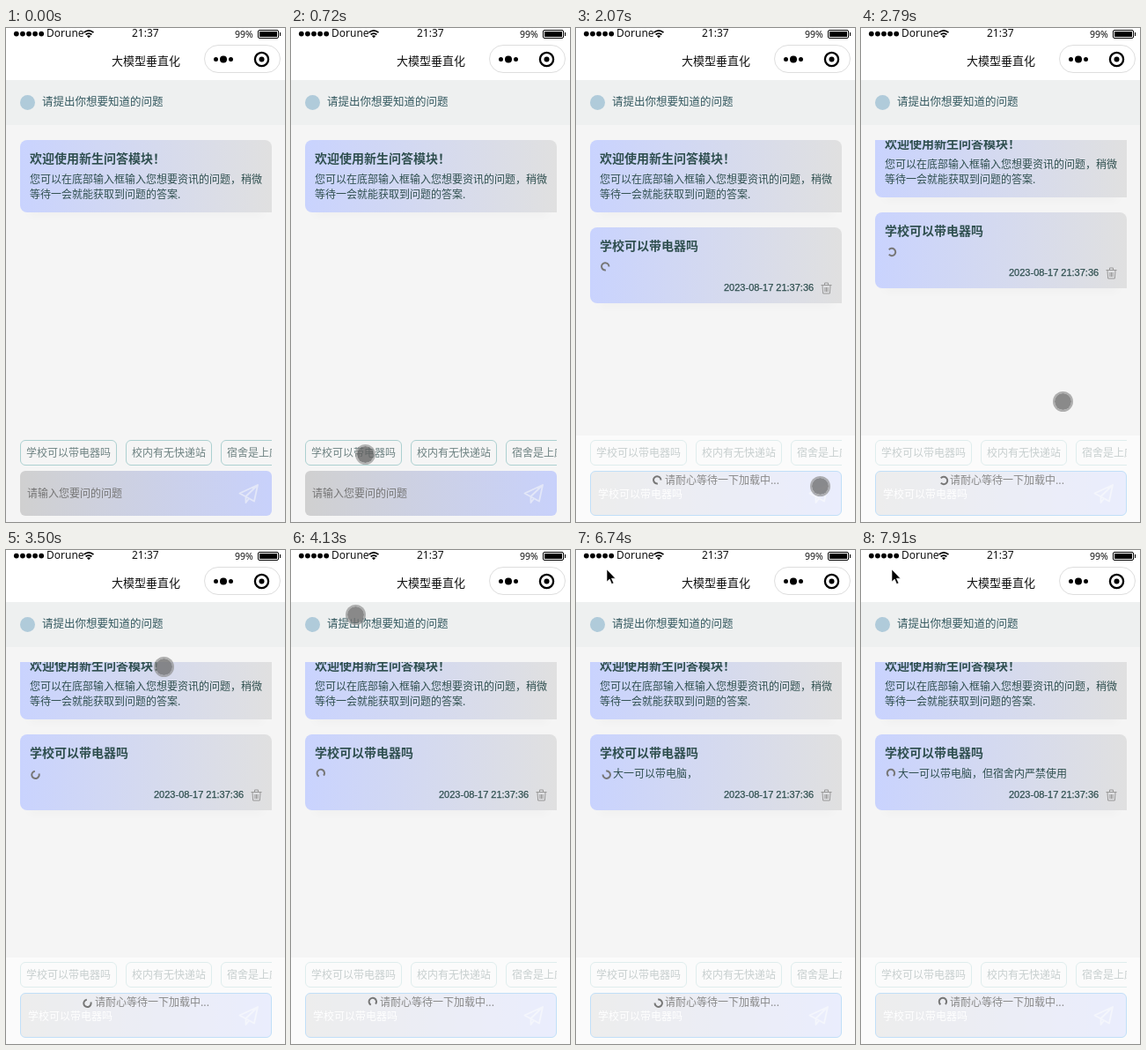
Animation of 317x560 px, one loop 8000 ms. Source, as an HTML page:

```html
<!DOCTYPE html>
<html lang="zh-CN">
<head>
<meta charset="utf-8">
<title>大模型垂直化</title>
<style>
html, body { margin: 0; width: 100%; height: 100%; overflow: hidden; }
body { background: #f5f5f5; font: 12px/20px "Noto Sans CJK SC", "Noto Sans CJK", sans-serif; color: #2f4f4f; }
#stage { position: relative; width: 317px; height: 560px; overflow: hidden; }
#stage div, #stage svg { position: absolute; box-sizing: border-box; }
.t { white-space: pre; }
.latin { font-family: "Noto Sans", "Open Sans", sans-serif; color: #111; }
#top { left: 0; top: 0; width: 317px; height: 59px; background: #fff; }
#capsule { left: 225px; top: 19px; width: 87px; height: 32px; border: 1px solid #dedede; border-radius: 16px; }
#head { left: 0; top: 59px; width: 317px; height: 51px; background: #eef0f0; }
#badge { left: 16px; top: 17px; width: 17px; height: 17px; border-radius: 50%; background: #b0cbda; }
#view { left: 0; top: 127px; width: 317px; height: 335px; overflow: hidden; }
#list { left: 0; top: 0; width: 317px; height: 400px; }
.card { left: 16px; width: 286px; border-radius: 8px 8px 0 8px;
  background: linear-gradient(90deg, #c9d3fe, #e0e0e0); box-shadow: 0 14px 10px -10px rgba(0,0,0,.025); }
.card .t { left: 11px; }
.card .title { top: 10px; font-size: 14px; font-weight: 700; }
#stage .date { left: 152px; top: 58px; font: 11px/20px "Liberation Sans", Arial, sans-serif; -webkit-text-stroke: .25px; }
#chips { left: 16px; top: 467px; width: 286px; height: 29px; overflow: hidden; }
.chip { top: 0; height: 29px; padding: 0 6px; border: 1px solid #acd0d0; border-radius: 6px;
  line-height: 26px; color: #6f8383; white-space: pre; }
#field { left: 16px; top: 502px; width: 286px; height: 51px; border: 1px solid transparent; border-radius: 6px;
  background: linear-gradient(90deg, #d0d0d0, #c8d1fb) border-box; }
#field .t { left: 7px; top: 14px; color: #757575; }
#field.filled { border-color: #5cacee; }
#field.filled .t { left: 8px; top: 15px; color: #fff; }
#mask { left: 0; top: 462px; width: 317px; height: 98px; background: rgba(255,255,255,.62); color: #888; }
#touch { width: 23px; height: 23px; margin: -11.5px 0 0 -11.5px; border-radius: 50%;
  background: rgba(112,112,112,.8) padding-box; border: 2px solid rgba(145,145,145,.7); }
#touch.down { background-color: rgba(95,95,95,.78); border-color: rgba(135,135,135,.6); }
</style>
</head>
<body>
<div id="stage">
  <div id="top">
    <svg width="317" height="59" style="left:0;top:0">
      <g id="signal" fill="#000"></g>
      <g fill="none" stroke="#000" stroke-width="1.7">
        <path d="M88.5 5.2Q94 .6 99.5 5.2M90.6 7.5Q94 4.7 97.4 7.5"/>
        <path d="M94 11.2L91.9 9Q94 7.5 96.1 9Z" fill="#000" stroke="none"/>
        <rect x="286.5" y="2.5" width="23" height="9" rx="1.5" stroke-width="1"/>
      </g>
      <path d="M288 4h20v6h-20zM311 5h1v4h-1z"/>
    </svg>
    <div class="t latin" style="left:46px;top:-4px">Dorune</div>
    <div class="t latin" style="left:143px;top:-4px">21:37</div>
    <div class="t latin" style="left:260px;top:-3px;font-size:10.5px">99%</div>
    <div class="t" style="left:120px;top:27px;font-size:13px;color:#111">大模型垂直化</div>
    <div id="capsule"></div>
    <svg width="80" height="20" style="left:230px;top:25px">
      <circle cx="8.5" cy="10.5" r="2.5"/><circle cx="17" cy="10.5" r="4"/><circle cx="25.5" cy="10.5" r="2.5"/>
      <circle cx="60.5" cy="10.5" r="7.6" fill="none" stroke="#000" stroke-width="2.3"/><circle cx="60.5" cy="10.5" r="3"/>
    </svg>
  </div>
  <div id="head">
    <div id="badge"></div>
    <div class="t" style="left:41px;top:14px;font-size:12.5px;color:#33585f">请提出你想要知道的问题</div>
  </div>
  <div id="view"><div id="list">
    <div class="card" style="top:0;height:82px">
      <div class="t title">欢迎使用新生问答模块！</div>
      <div class="t" style="top:34px">您可以在底部输入框输入您想要资讯的问题，稍微</div>
      <div class="t" style="top:51px">等待一会就能获取到问题的答案.</div>
    </div>
    <div class="card" id="reply" style="top:99px;height:86px">
      <div class="t title">学校可以带电器吗</div>
      <svg class="spin" width="14" height="14" style="left:10.5px;top:38px"></svg>
      <div class="t" id="answer" style="left:26px;top:34px"></div>
      <div class="t date">2023-08-17 21:37:36</div>
      <svg width="13" height="14" style="left:262px;top:62px" fill="none" stroke="#999">
        <path d="M.5 3.5h12M4.5 3V1h4v2M2 4l.7 9h7.6L11 4M4.9 6v5M6.5 6v5M8.1 6v5"/>
      </svg>
    </div>
  </div></div>
  <div id="chips">
    <div class="chip" style="left:0;width:110px">学校可以带电器吗</div>
    <div class="chip" style="left:120px;width:98px">校内有无快递站</div>
    <div class="chip" style="left:228px;width:110px">宿舍是上床下桌吗</div>
  </div>
  <div id="field">
    <div class="t" id="query"></div>
    <svg width="24" height="24" style="left:247px;top:13px" fill="none" stroke="#e3e7f8" stroke-width="1.8" stroke-linejoin="round">
      <path d="M22 2L1.5 11.5L7 14.5L18 20.5ZM22 2L8.5 15V22L12 17.5"/>
    </svg>
  </div>
  <div id="mask">
    <svg class="spin" width="14" height="14" style="left:86px;top:44px"></svg>
    <div class="t" style="left:101px;top:40px">请耐心等待一下加载中...</div>
  </div>
  <div id="touch"></div>
  <svg id="arrow" width="14" height="20" style="overflow:visible">
    <path d="M0 0V14L3.2 11L5.6 16.5L7.8 15.5L5.4 10.2H9.8Z" stroke="#fff" stroke-width=".6"/>
  </svg>
</div>
<script>
const $ = id => document.getElementById(id);
const LOOP = 8000, TICK = 90;
const PRESS = 720, FILL = 990, PRESS_SEND = 1800, SEND = 2070;
const TYPE = 5480, CHAR = 144;
const REPLY = "大一可以带电脑，但宿舍内严禁使用";

// pointer path: time, x, y
const path = [
  [90, 28, 7], [270, 62, 120], [450, 93, 320], [630, 96, 462], [720, 84.5, 483.5],
  [900, 84.5, 483.5], [1170, 115, 494], [1440, 210, 522], [1710, 278.5, 531.5], [1800, 281, 527],
  [1980, 281, 527], [2430, 262, 487], [2790, 229, 423], [3240, 195, 215], [3690, 157, 8],
  [3870, 122, 36], [4140, 73, 73], [4320, 46, 38], [4590, 35, 22]
];

$("signal").innerHTML = [0, 1, 2, 3, 4].map(i => `<circle cx="${11.8 + i * 7.1}" cy="6.6" r="2.9"/>`).join("");
const spinners = document.querySelectorAll(".spin");
for (const s of spinners)
  s.innerHTML = '<path d="M9.2 9.7A4.2 4.2 0 1 1 9.2 4.3" fill="none" stroke="#777" stroke-width="2"/>';

const clamp = (v, a, b) => Math.min(b, Math.max(a, v));
const between = (t, a, b) => t >= a && t < b;
const show = (el, on) => { el.style.visibility = on ? "visible" : "hidden"; };

function pointerAt(t) {
  const i = path.findIndex(p => p[0] > t);
  if (i < 0) return path[path.length - 1].slice(1);
  if (i === 0) return path[0].slice(1);
  const [t0, x0, y0] = path[i - 1], [t1, x1, y1] = path[i];
  const k = (t - t0) / (t1 - t0);
  return [x0 + (x1 - x0) * k, y0 + (y1 - y0) * k];
}

function drawPointer(t) {
  const [x, y] = pointerAt(t), inPage = y > 59, on = t >= path[0][0];
  for (const el of [$("touch"), $("arrow")]) {
    el.style.left = x + "px";
    el.style.top = y + "px";
  }
  show($("touch"), on && inPage);
  show($("arrow"), on && !inPage);
  $("touch").classList.toggle("down", between(t, PRESS, FILL) || between(t, PRESS_SEND, SEND));
}

function render(time) {
  // the screen refreshes in steps, slightly ahead in the second half
  const t = Math.floor((time + (time > 3600 ? 10 : 0)) / TICK) * TICK;
  const filled = t >= FILL, sent = t >= SEND;
  $("field").classList.toggle("filled", filled);
  $("query").textContent = filled ? "学校可以带电器吗" : "请输入您要问的问题";
  $("reply").style.display = $("mask").style.display = sent ? "block" : "none";

  const k = clamp((t - SEND) / 270, 0, 1);
  $("list").style.top = -17 * k * (2 - k) + "px";
  $("answer").textContent = REPLY.slice(0, Math.max(0, Math.floor((t - TYPE) / CHAR)));

  const angle = 180 + (t - 2790) / 1870 * 360;
  for (const s of spinners) s.style.transform = `rotate(${angle}deg)`;
  drawPointer(t);
}

const start = performance.now();
function frame() {
  render((performance.now() - start) % LOOP);
  requestAnimationFrame(frame);
}
frame();
</script>
</body>
</html>
```
